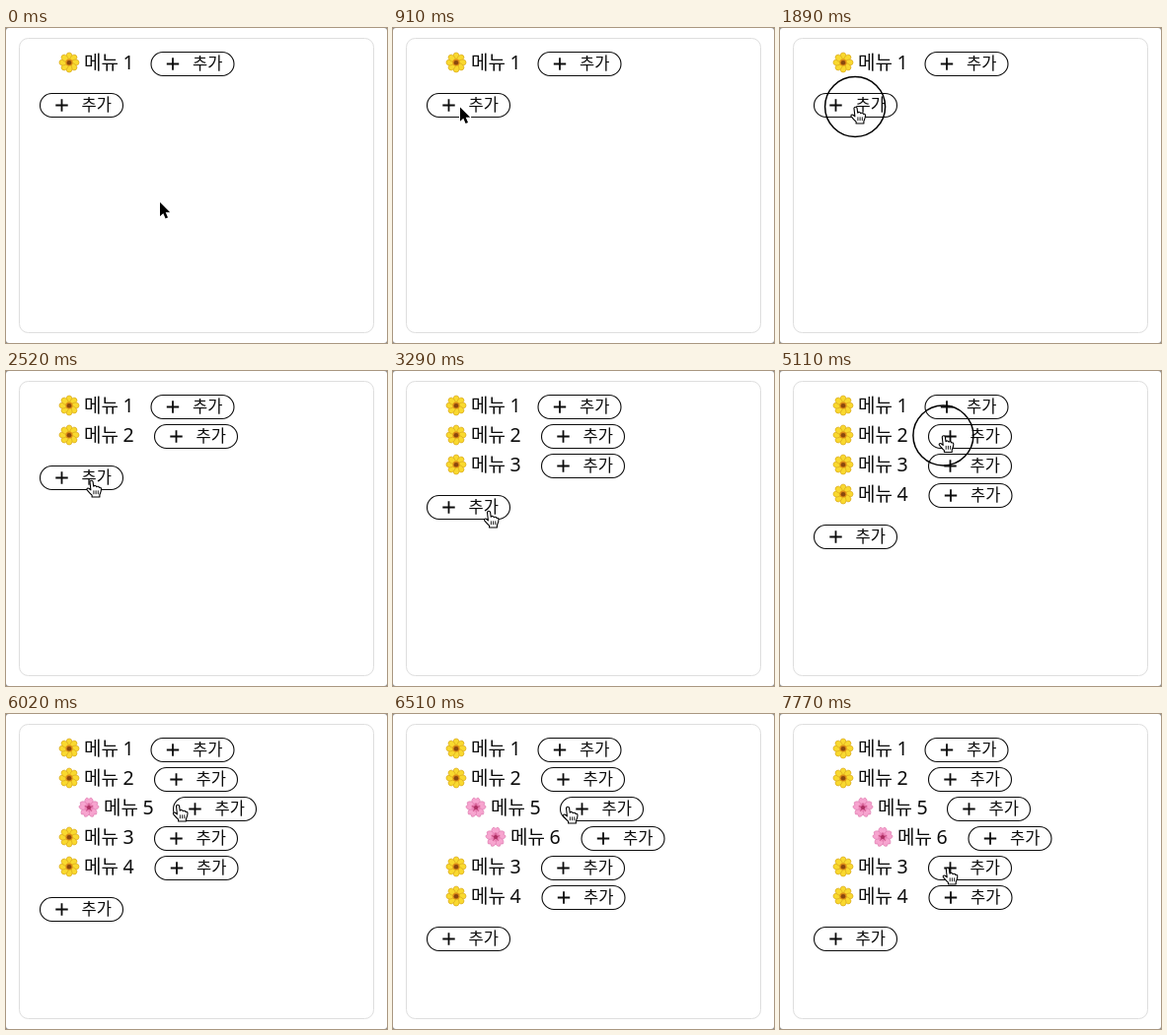
Recreate the animation shown at these times as an HTML page with a canvas. Size 386 by 320 pixels, loop 8000 ms.

```html
<!DOCTYPE html>
<html lang="ko">
<head>
<meta charset="utf-8">
<title>메뉴</title>
<style>
  html, body { margin: 0; width: 100%; height: 100%; overflow: hidden; background: #fff; }
  canvas { display: block; width: 386px; height: 320px; }
</style>
</head>
<body>
<canvas id="stage"></canvas>
<script>
const W = 386, H = 320, LOOP = 8000, STEP = 70;
const INK = '#0c0c0c';
const KOREAN = '"Noto Sans CJK KR", "Noto Sans CJK", "Noto Sans CJK JP", sans-serif';
const canvas = document.getElementById('stage');
const dpr = window.devicePixelRatio || 1;
canvas.width = W * dpr;
canvas.height = H * dpr;
const ctx = canvas.getContext('2d');

// Display order; gap is the button's offset from the row's indent.
const rows = [
  { n: 1, born: 0, depth: 0, gap: 147 },
  { n: 2, born: 1960, depth: 0, gap: 150.5 },
  { n: 5, born: 5250, depth: 1, gap: 149.5 },
  { n: 6, born: 6510, depth: 2, gap: 151 },
  { n: 3, born: 2940, depth: 0, gap: 150.5 },
  { n: 4, born: 3920, depth: 0, gap: 151 }
];

// Pointer moves: start, end, target x, target y.
const origin = [156, 177];
const moves = [
  [0, 350, 78, 72],
  [420, 630, 69, 79],
  [700, 910, 68, 80.5],
  [1330, 1540, 76.5, 80],
  [2170, 2520, 86.5, 111],
  [3080, 3290, 97, 142],
  [3360, 3500, 97, 142.7],
  [3990, 4480, 165.8, 65.5],
  [5390, 6020, 174, 92],
  [6020, 6160, 177, 94],
  [7070, 7770, 169.8, 156]
];
const FOCUS = 1400;

// Click rings: start, end, radius.
const rings = [
  [1050, 1120, 22],
  [1890, 1960, 30.5],
  [2800, 2940, 31],
  [2940, 3010, 22],
  [3780, 3850, 22],
  [3850, 3920, 30.5],
  [5110, 5250, 30.5],
  [6300, 6510, 31]
];

const BTN_W = 84, BTN_H = 24;

function layout(t) {
  const shown = rows.filter(r => t >= r.born);
  const buttons = shown.map((r, i) => ({ x: r.gap + r.depth * 20, y: 24.5 + i * 30 }));
  buttons.push({ x: 34.5, y: 36.5 + shown.length * 30 });
  return { shown, buttons };
}

const ease = p => p * p * (3 - 2 * p);

function pointer(t) {
  let [x, y] = origin, seen = 0;
  for (const [start, end, tx, ty] of moves) {
    if (t <= start) break;
    const p = ease(Math.min(1, (t - start) / (end - start)));
    x += (tx - x) * p;
    y += (ty - y) * p;
    seen = Math.min(t, end);
  }
  // The shape only refreshes while the pointer moves.
  const over = layout(seen).buttons.some(b =>
    x >= b.x && x <= b.x + BTN_W && y >= b.y && y <= b.y + BTN_H);
  return { x, y, hand: seen >= FOCUS && over };
}

function text(str, x, y, size, family) {
  ctx.font = `${size}px ${family}`;
  ctx.fillStyle = INK;
  ctx.fillText(str, x, y);
}

function disc(x, y, r, fill) {
  ctx.beginPath();
  ctx.arc(x, y, r, 0, Math.PI * 2);
  ctx.fillStyle = fill;
  ctx.fill();
}

function around(count, draw) {
  for (let i = 0; i < count; i++) {
    ctx.save();
    ctx.rotate(i * Math.PI * 2 / count);
    draw();
    ctx.restore();
  }
}

function daisy() {
  ctx.fillStyle = '#f9d92f';
  ctx.strokeStyle = '#d5a21b';
  ctx.lineWidth = 0.6;
  around(8, () => {
    ctx.beginPath();
    ctx.ellipse(0, -6.2, 3, 3.9, 0, 0, Math.PI * 2);
    ctx.fill();
    ctx.stroke();
  });
  disc(0, 0, 3.6, '#dc8b16');
  disc(0, 0.2, 2.3, '#8a470f');
}

function blossom() {
  const shade = ctx.createRadialGradient(0, 0, 1, 0, 0, 10);
  shade.addColorStop(0, '#e4629f');
  shade.addColorStop(0.5, '#f7a6d0');
  shade.addColorStop(1, '#f5a0cd');
  ctx.fillStyle = shade;
  ctx.strokeStyle = '#dd78ad';
  ctx.lineWidth = 0.6;
  around(5, () => {
    ctx.beginPath();
    ctx.moveTo(0, -0.5);
    ctx.bezierCurveTo(-5, -3.5, -5.4, -8, -2, -10);
    ctx.lineTo(0, -8.6);
    ctx.lineTo(2, -10);
    ctx.bezierCurveTo(5.4, -8, 5, -3.5, 0, -0.5);
    ctx.fill();
    ctx.stroke();
  });
  ctx.strokeStyle = '#b83a70';
  ctx.lineWidth = 0.8;
  around(5, () => {
    ctx.beginPath();
    ctx.moveTo(0, 0);
    ctx.lineTo(0, -4.4);
    ctx.stroke();
  });
  disc(0, 0, 2, '#ad2f62');
}

function button({ x, y }) {
  ctx.beginPath();
  ctx.roundRect(x, y, BTN_W, BTN_H, BTN_H / 2);
  ctx.fillStyle = '#fff';
  ctx.fill();
  ctx.strokeStyle = INK;
  ctx.lineWidth = 1.1;
  ctx.stroke();

  const cx = x + 22, cy = y + 12;
  ctx.beginPath();
  ctx.moveTo(cx - 6.2, cy);
  ctx.lineTo(cx + 6.2, cy);
  ctx.moveTo(cx, cy - 6.2);
  ctx.lineTo(cx, cy + 6.2);
  ctx.lineWidth = 1.8;
  ctx.stroke();
  text('추가', x + 42, y + 17.7, 16.5, KOREAN);
}

function row(r, i) {
  const x = r.depth * 20, y = 35 + i * 30;
  ctx.save();
  ctx.translate(x + 64, y);
  r.depth ? blossom() : daisy();
  ctx.restore();
  text('메뉴', x + 79, y + 7, 19, KOREAN);
  text(r.n, x + 118.6, y + 7, 19.5, '"Noto Sans", "Open Sans", sans-serif');
}

const arrowShape = new Path2D('M0 0V14.2L3.3 11.2L5.6 16.6L8 15.6L5.7 10.3H10.2Z');
const handShape = new Path2D(
  'M-1.5 1.6C-1.5 -.2 1.4 -.2 1.6 1.6L2.2 6.2C2.8 5 5 5.2 5.2 6.7' +
  'C6 5.8 7.7 6.2 7.9 7.5C9 6.9 10 7.6 10 8.8C10 12 9 13 8.4 14.6V17' +
  'H.6V15.2C-1.2 13.5 -2.6 11.8 -4.4 9.8C-5.2 8.4 -3.5 7.4 -2.2 8.5L-.6 9.8Z');
const creases = new Path2D('M2.4 10.4V14.2M4.6 10.4V14.2M6.8 10.4V14.2');

function drawPointer({ x, y, hand }) {
  ctx.save();
  ctx.translate(x, y);
  ctx.lineJoin = 'round';
  if (hand) {
    ctx.fillStyle = '#fff';
    ctx.strokeStyle = '#000';
    ctx.lineWidth = 1.1;
    ctx.fill(handShape);
    ctx.stroke(handShape);
    ctx.lineWidth = 0.9;
    ctx.stroke(creases);
  } else {
    ctx.strokeStyle = '#fff';
    ctx.lineWidth = 2;
    ctx.stroke(arrowShape);
    ctx.fillStyle = '#000';
    ctx.fill(arrowShape);
  }
  ctx.restore();
}

function backdrop() {
  ctx.fillStyle = '#8c8c8c';
  ctx.fillRect(0, 0, W, H);
  ctx.beginPath();
  ctx.roundRect(0, 0, W, H, 3);
  ctx.fillStyle = '#fff';
  ctx.fill();
  ctx.beginPath();
  ctx.roundRect(13.5, 10.5, 359, 299, 9);
  ctx.strokeStyle = '#dedede';
  ctx.lineWidth = 1;
  ctx.stroke();
}

function render(t) {
  ctx.setTransform(dpr, 0, 0, dpr, 0, 0);
  backdrop();
  const { shown, buttons } = layout(t);
  shown.forEach(row);
  buttons.forEach(button);

  const p = pointer(t);
  drawPointer(p);
  const ring = rings.find(([start, end]) => t >= start && t < end);
  if (ring) {
    ctx.beginPath();
    ctx.arc(p.x - 0.4, p.y, ring[2], 0, Math.PI * 2);
    ctx.strokeStyle = '#000';
    ctx.lineWidth = 1.5;
    ctx.stroke();
  }
}

let began;
function tick(now) {
  began ??= now;
  const t = (now - began) % LOOP;
  render(Math.floor(t / STEP) * STEP);
  requestAnimationFrame(tick);
}
render(0);
requestAnimationFrame(tick);
</script>
</body>
</html>
```
